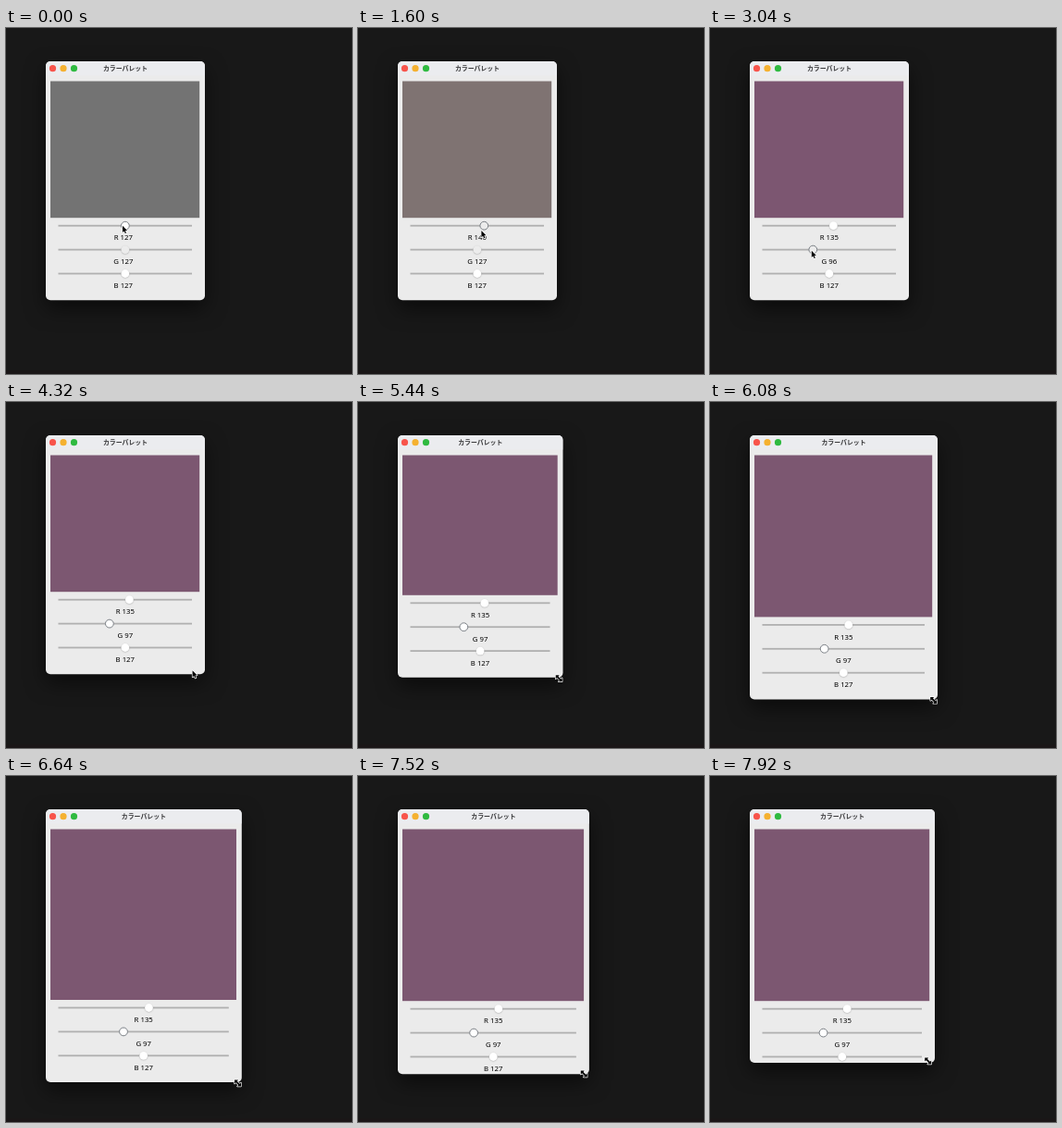
These frames come from a looping animation (374 px wide and 374 px high, 8 s). An HTML page with a canvas:

```html
<!DOCTYPE html>
<html lang="ja">
<meta charset="utf-8">
<title>カラーパレット</title>
<style>
html, body { margin: 0; width: 100%; height: 100%; overflow: hidden; background: #181818 }
canvas { display: block; width: 374px; height: 374px }
</style>
<canvas></canvas>
<script>
const SIZE = 374, LOOP = 8000, STEP = 80, LEFT = 43, TOP = 36;
const FULL_BOTTOM = 332.2, FOOTER = 89;
const canvas = document.querySelector('canvas');
const g = canvas.getContext('2d');
const dpr = window.devicePixelRatio || 1;
canvas.width = canvas.height = SIZE * dpr;

// Bottom right corner of the window: [time, x, y]
const CORNER = [[5280, 215, 294.2], [5440, 221.5, 297.8], [6080, 246, 321.4],
  [6640, 254.8, 331], [6960, 255.4, FULL_BOTTOM], [7200, 255.4, FULL_BOTTOM], [7920, 243, 310]];

const span = (t, from, to) => Math.min(1, Math.max(0, (t - from) / (to - from)));
const mix = (a, b, p) => a.map((v, i) => v + (b[i] - v) * p);

function cornerAt(t) {
  return CORNER.reduce((pos, [time, ...xy], i) =>
    i ? mix(pos, xy, span(t, CORNER[i - 1][0], time)) : xy, null);
}

function disc(x, y, r, fill) {
  g.beginPath();
  g.arc(x, y, r, 0, 7);
  g.fillStyle = fill;
  g.fill();
}

function shadow(color, blur, dy) {
  g.shadowColor = color;
  g.shadowBlur = blur * dpr;
  g.shadowOffsetY = dy * dpr;
}

function text(s, x, y, font, fill) {
  g.font = font;
  g.fillStyle = fill;
  g.fillText(s, x, y);
}

const knobX = (value, right) => 56.9 + (right - 70.5) * value / 255;

function slider(name, value, y, right, labelX, focused, pressed) {
  const x = knobX(value, right);
  g.fillStyle = '#b0b0b0';
  g.fillRect(56.5, y - 0.9, right - 70.5, 1.8);
  g.save();
  if (!focused) shadow('rgba(0,0,0,.25)', 1.5, 0.5);
  disc(x, y, 4.4, pressed ? '#ececec' : '#fff');
  g.restore();
  if (focused) {
    g.strokeStyle = '#7b8086';
    g.lineWidth = 1;
    g.stroke();
  }
  text(`${name} ${Math.round(value)}`, labelX, y + 15.6, '500 7.8px "Noto Sans", sans-serif', '#000');
}

function polygon(points) {
  g.beginPath();
  points.forEach(p => g.lineTo(...p));
  g.closePath();
  g.lineJoin = 'round';
  g.strokeStyle = '#fff';
  g.lineWidth = 1.3;
  g.stroke();
  g.fillStyle = '#000';
  g.fill();
}

// The pointer drags the red knob, then the green one, then the corner
function pointer(t, redX, greenX, right, bottom) {
  const lead = 3 * span(t, 7200, 7920);
  const onRed = [redX - 2.9, 213.8 + 6 * span(t, 480, 1760)];
  const onGreen = [greenX - 1.5, 240.7];
  const onCorner = [right - 4.3 - lead, bottom + 1 - lead];
  const glide = 1 - (1 - span(t, 3440, 5040)) ** 3;
  g.save();
  g.translate(...mix(mix(onRed, onGreen, span(t, 2080, 2320)), onCorner, glide));
  if (t < 4560) {
    polygon([[0, 0], [0, 7.2], [1.7, 5.7], [2.8, 8.3], [4, 7.8], [2.9, 5.3], [5.1, 5.2]]);
  } else {
    const half = [[-3.5, -3.5], [0.5, -3.5], [-0.7, -2.1], [2.1, 0.7], [3.5, -0.5]];
    polygon([...half, ...half.map(([x, y]) => [-x, -y])]);
  }
  g.restore();
}

function draw(t) {
  const [right, bottom] = cornerAt(t);
  const drag = span(t, 480, 1760);
  const red = 127 + 8 * drag + 16 * Math.sin(Math.PI * drag);
  const green = 127 - 31 * span(t, 2400, 2880) + (t >= 3120);
  const width = right - LEFT, mid = (LEFT + right) / 2;
  // The colour area never gets shorter once it has grown
  const floor = (t > 6960 ? FULL_BOTTOM : bottom) - FOOTER;

  g.setTransform(dpr, 0, 0, dpr, 0, 0);
  g.textAlign = 'center';
  g.fillStyle = '#181818';
  g.fillRect(0, 0, SIZE, SIZE);
  g.fillStyle = '#1a1617';
  g.fillRect(0, 370, SIZE, 4);

  g.save();
  g.beginPath();
  g.roundRect(LEFT, TOP, width, bottom - TOP, 5);
  g.save();
  shadow('rgba(0,0,0,.55)', 22, 9);
  g.fillStyle = '#ebebeb';
  g.fill();
  g.restore();
  g.clip();
  g.fillStyle = '#ebecef';
  g.fillRect(LEFT, TOP, width, 15.5);
  ['#f8544b', '#f5b130', '#2fba40'].forEach((c, i) => disc(50.5 + 11.5 * i, 43.7, 3.6, c));
  text('カラーパレット', mid, 46.2, 'bold 6.9px "Noto Sans CJK JP", "Noto Sans CJK", sans-serif', '#38383a');

  const dr = red - 127, dg = green - 127;
  g.fillStyle = `rgb(${115 + 0.9 * dr - 0.06 * dg},${115 + 0.93 * dg},${115 - 0.1 * dr + 0.03 * dg})`;
  g.fillRect(48, 57.5, right - 5.8 - 48, floor - 57.5);

  // Labels settle into the centre once the first drag begins
  const labelX = mid - (t < 400 ? 2.2 : 0.2);
  const onGreen = t >= 2400;
  slider('R', red, floor + 8.5, right, labelX, !onGreen, t >= 400 && t < 1920);
  slider('G', green, floor + 34.4, right, labelX, onGreen, t < 3280);
  slider('B', 127, floor + 60.3, right, labelX, false, false);
  g.restore();
  pointer(t, knobX(red, right), knobX(green, right), right, bottom);
}

function frame() {
  draw(Math.floor(performance.now() % LOOP / STEP) * STEP);
  requestAnimationFrame(frame);
}
frame();
</script>
</html>
```
